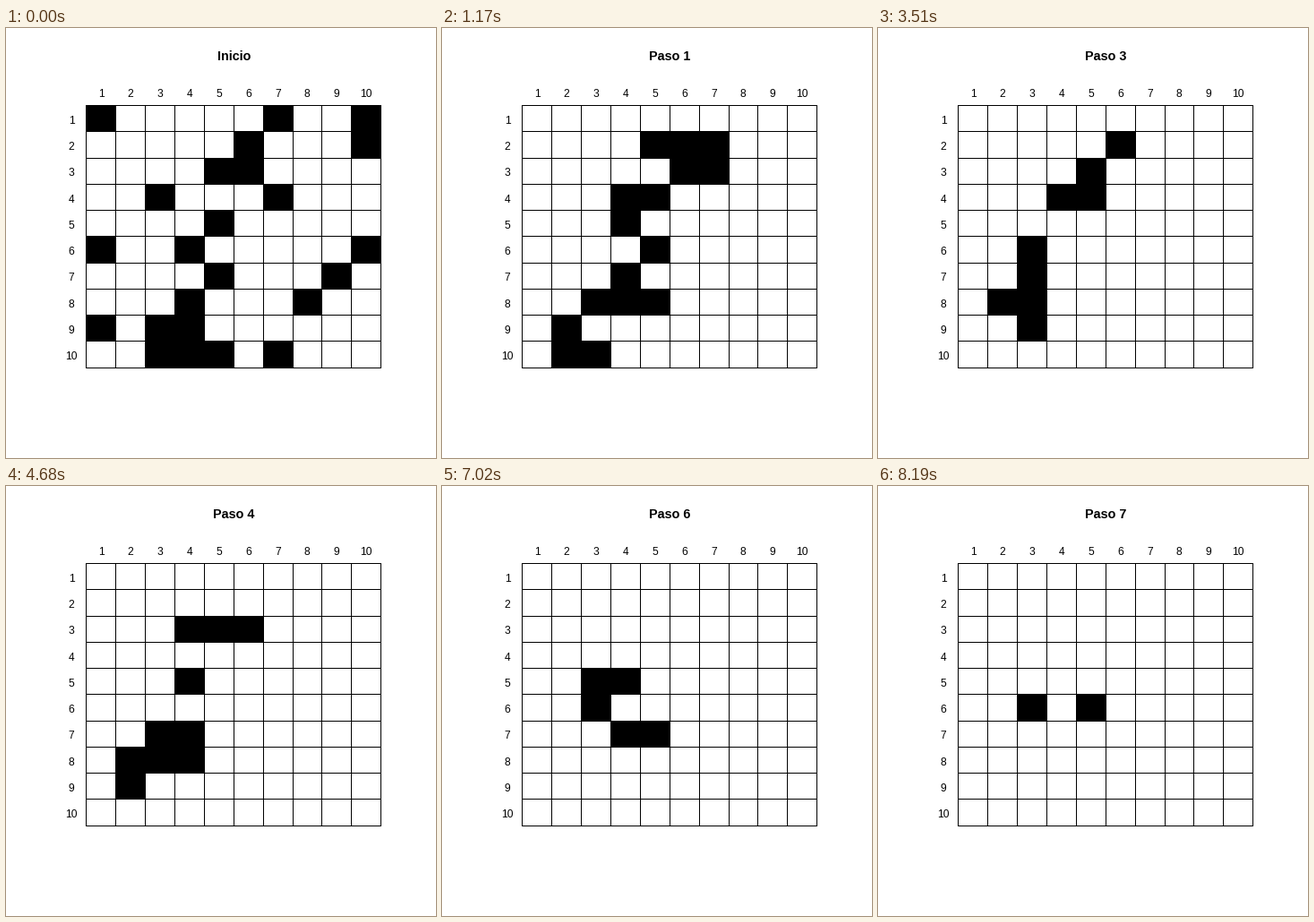
Animation, 480 px wide and 480 px high, one loop 9.36 s. Source, as a matplotlib script:

```python
import numpy as np
import matplotlib.pyplot as plt
from matplotlib.animation import FuncAnimation
from matplotlib.patches import Rectangle

SIZE, DPI = 480, 100
N = 10
STEPS = 8
STEP_MS = 1170

plt.rcParams["font.family"] = "Liberation Sans"
plt.rcParams["toolbar"] = "None"

# Live columns of each row at the start, counted from 1
START = [(1, 7, 10), (6, 10), (5, 6), (3, 7), (5,),
         (1, 4, 10), (5, 9), (4, 8), (1, 3, 4), (3, 4, 5, 7)]

# Pixel positions of the grid lines
xs = np.rint(89.3 + 32.89 * np.arange(N + 1)).astype(int)
ys = np.rint(86.2 + 29.24 * np.arange(N + 1)).astype(int)


def px(pixels):
    """Font size in points for a height in pixels."""
    return pixels * 72 / DPI


def next_grid(grid):
    """A cell is alive next when exactly three neighbours are alive now."""
    p = np.pad(grid, 1)
    around = sum(p[r:r + N, c:c + N] for r in range(3) for c in range(3)) - grid
    return (around == 3).astype(int)


def history():
    grid = np.zeros((N, N), int)
    for r, cols in enumerate(START):
        for c in cols:
            grid[r, c - 1] = 1
    grids = [grid]
    while len(grids) < STEPS:
        grids.append(next_grid(grids[-1]))
    return grids


fig = plt.figure(figsize=(SIZE / DPI, SIZE / DPI), dpi=DPI, facecolor="white")
ax = fig.add_axes([0, 0, 1, 1])
ax.set_xlim(0, SIZE)
ax.set_ylim(SIZE, 0)
ax.axis("off")


def box(x0, y0, x1, y1):
    return ax.add_patch(Rectangle((x0, y0), x1 - x0, y1 - y0, facecolor="black",
                                  linewidth=0, antialiased=False))


def label(x, y, text, size=12, **kw):
    return ax.text(x, y, text, fontsize=px(size), color="black",
                   ha="center", va="baseline", **kw)


for x in xs:
    box(x, ys[0], x + 1, ys[-1] + 1)
for y in ys:
    box(xs[0], y, xs[-1] + 1, y + 1)

for k in range(N):
    label(106 + 32.89 * k, 77, str(k + 1))
    label(73, 107 + 29.24 * k, str(k + 1))

title = label(254.3, 36, "Inicio", 14.4, weight="bold")
cells = [[box(xs[c], ys[r], xs[c + 1], ys[r + 1]) for c in range(N)]
         for r in range(N)]
grids = history()


def draw(step):
    title.set_text(f"Paso {step}" if step else "Inicio")
    for r in range(N):
        for c in range(N):
            cells[r][c].set_visible(bool(grids[step][r, c]))
    return [title] + sum(cells, [])


anim = FuncAnimation(fig, draw, frames=STEPS, interval=STEP_MS,
                     init_func=lambda: draw(0), repeat=True, repeat_delay=0)
plt.show()
```
